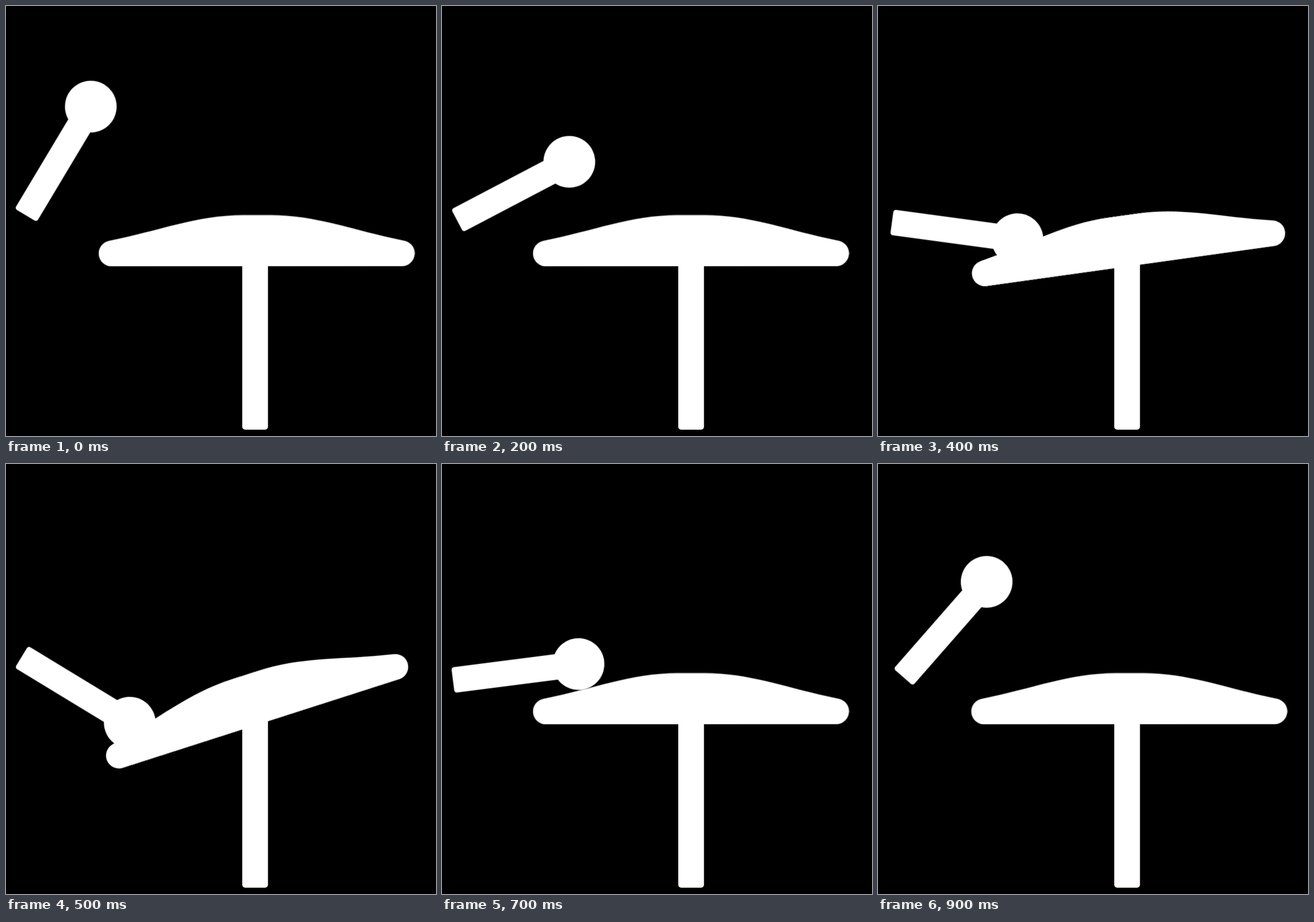
Animation of 748x748 px, one loop 1000 ms. Source, as an HTML page:

```html
<!DOCTYPE html>
<html lang="en">
<head>
<meta charset="utf-8">
<title>Mallet and plate</title>
<style>
  html, body { margin: 0; width: 100%; height: 100%; overflow: hidden; background: #000; }
  svg { display: block; width: 100%; height: 100%; fill: #fff; }

  /* Each pose is held for a tenth of the loop. */
  .mallet { animation: swing 1s step-end infinite; }
  .plate { animation: tilt 1s step-end infinite; }

  @keyframes swing {
    0%, 100% { transform: translate(147.5px, 175px) rotate(-59.1deg); }
    10%, 90% { transform: translate(189px, 205px) rotate(-48.8deg); }
    20%, 80% { transform: translate(221.5px, 271px) rotate(-27.7deg); }
    30%, 70% { transform: translate(237.5px, 348px) rotate(-7.3deg); }
    40%, 60% { transform: translate(242.5px, 405.7px) rotate(7.7deg); }
    50% { transform: translate(215.3px, 450px) rotate(31.3deg); }
  }

  @keyframes tilt {
    0%, 100% { transform: translate(436.5px, 430.4px); }
    10%, 20%, 30%, 70% { transform: translate(433.5px, 430.4px); }
    40%, 60% { transform: translate(436.2px, 430.2px) rotate(-7.9deg); }
    50% { transform: translate(437.2px, 430px) rotate(-17.75deg); }
    80% { transform: translate(436.2px, 430.2px) rotate(7.9deg); }
    90% { transform: translate(437.5px, 430.4px); }
  }
</style>
</head>
<body>
<svg viewBox="0 0 748 748">
  <rect x="411" y="425" width="44.7" height="312" rx="5"/>
  <path class="plate" d="M-253 22.5 A22.5 22.5 0 0 1 -257 -22.1
    C-168 -39.5 -106 -66.5 -25 -66.5 H25
    C106 -66.5 168 -39.5 257 -22.1 A22.5 22.5 0 0 1 253 22.3 Z"/>
  <g class="mallet">
    <rect x="-220.3" y="-22.3" width="220.3" height="44.6" rx="4.5"/>
    <circle r="45"/>
  </g>
</svg>
</body>
</html>
```
